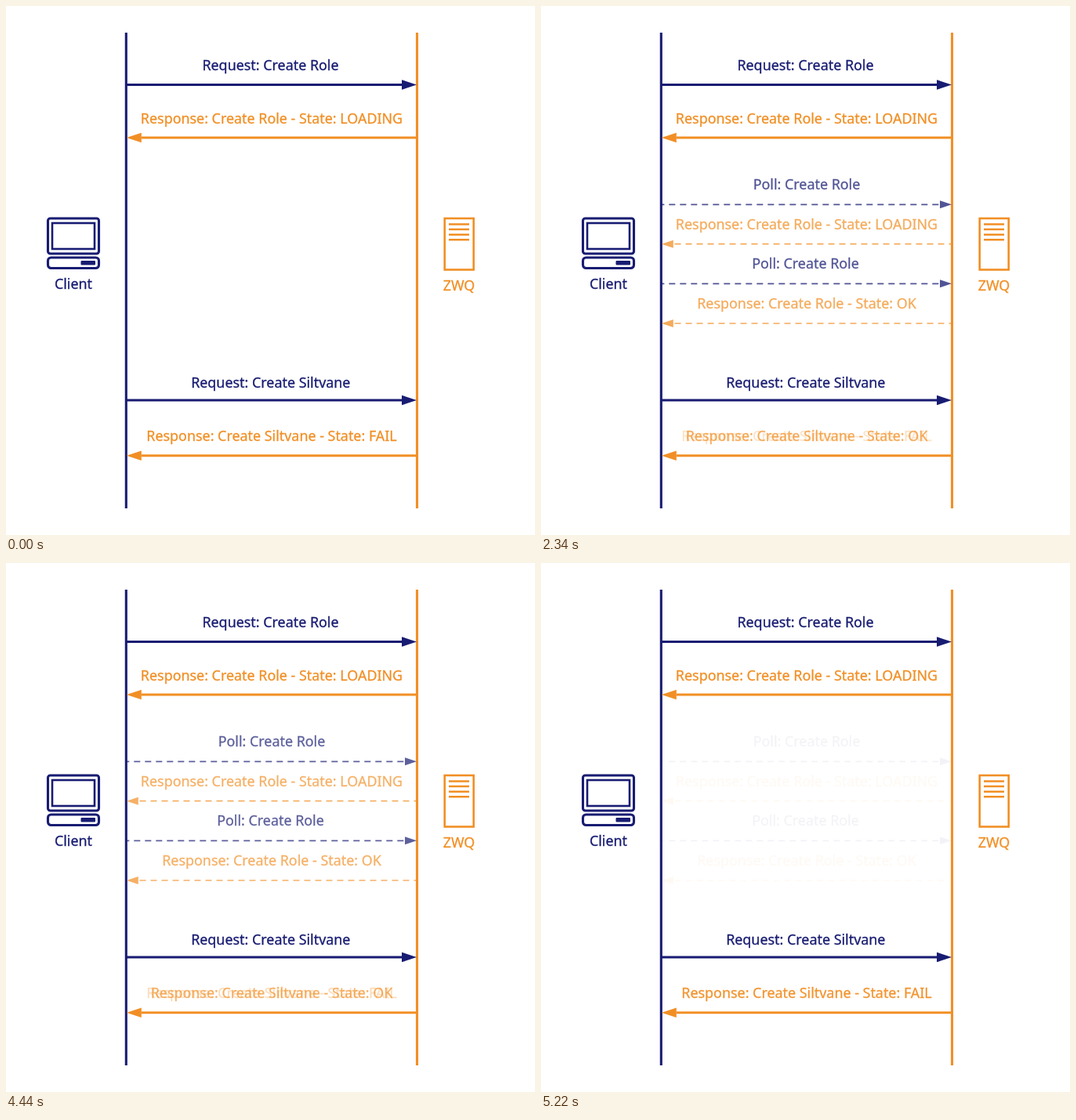
Recreate the animation shown at these times as an HTML page. Size 675 px wide and 675 px high, loop 5.28 s.

```html
<!DOCTYPE html>
<html lang="en">
<head>
<meta charset="utf-8">
<title>Polling sequence</title>
<style>
  html, body { margin: 0; width: 100%; height: 100%; overflow: hidden; background: #fff; }
  svg { display: block; width: 100%; height: 100%; }
  text {
    font: 17.9px "Noto Sans", "Open Sans", sans-serif;
    text-anchor: middle;
    stroke: currentColor;
    stroke-width: 0.3;
  }
  .navy { color: #181c72; }
  .orange { color: #f18f25; }
  .ink { fill: currentColor; }
  .line { fill: none; stroke: currentColor; stroke-width: 3.1; }
  .thin { stroke-width: 2.6; }
  .dashed { stroke-width: 1.7; stroke-dasharray: 8 6; stroke-dashoffset: 4; }
</style>
</head>
<body>
<svg viewBox="0 0 675 675">
  <g id="base">
    <g class="navy">
      <path class="line" d="M153.3 34V641"/>
      <rect class="line" x="53.5" y="271" width="65" height="45" rx="3"/>
      <rect class="line thin" x="59" y="277" width="54" height="33"/>
      <rect class="line" x="53.5" y="321" width="65" height="13.5" rx="4"/>
      <rect class="ink" x="95.5" y="325" width="18.5" height="5.5" rx="1"/>
      <text class="ink" x="86" y="361">Client</text>
    </g>
    <g class="orange">
      <path class="line" d="M524.5 34V641"/>
      <rect class="line thin" x="559.7" y="271" width="37" height="65.5"/>
      <path class="line thin" d="M565 278.5h26M565 285h26M565 291.7h26M565 298.3h26"/>
      <text class="ink" x="578" y="363">ZWQ</text>
    </g>
  </g>
  <g id="poll"></g>
  <g id="fail"></g>
  <g id="ok"></g>
</svg>
<script>
const LOOP = 5280;
const LEFT = 153.3, RIGHT = 524.5;
const layer = id => document.getElementById(id);

function add(parent, tag, attrs, text = "") {
  const el = document.createElementNS(parent.namespaceURI, tag);
  for (const key in attrs) el.setAttribute(key, attrs[key]);
  el.textContent = text;
  return parent.appendChild(el);
}

function label(id, tone, x, y, text) {
  add(layer(id), "text", { class: `ink ${tone}`, x, y }, text);
}

// Navy arrows point right, orange arrows point left.
function arrow(id, tone, y, dashed) {
  const right = tone === "navy";
  const dir = right ? 1 : -1;
  const from = right ? LEFT : RIGHT;
  const tip = right ? RIGHT - 0.5 : LEFT + 0.5;
  const [len, half] = dashed ? [15, 5] : [19, 6.3];
  const neck = tip - dir * len;
  const g = add(layer(id), "g", { class: tone });
  add(g, "path", { class: dashed ? "line dashed" : "line", d: `M${from} ${y}H${neck}` });
  add(g, "path", { class: "ink", d: `M${tip} ${y}L${neck} ${y - half}V${y + half}Z` });
}

[
  ["base", "navy", 337.5, 82, "Request: Create Role", 100.5],
  ["base", "orange", 339, 150, "Response: Create Role - State: LOADING", 168],
  ["poll", "navy", 339, 234, "Poll: Create Role", 253.3],
  ["poll", "orange", 339, 285, "Response: Create Role - State: LOADING", 303.7],
  ["poll", "navy", 337.5, 335, "Poll: Create Role", 354.3],
  ["poll", "orange", 339, 386, "Response: Create Role - State: OK", 405],
  ["base", "navy", 337.8, 487, "Request: Create Siltvane", 503]
].forEach(([id, tone, x, y, text, lineY]) => {
  label(id, tone, x, y, text);
  arrow(id, tone, lineY, id === "poll");
});
arrow("base", "orange", 573.8);
label("fail", "orange", 339, 555, "Response: Create Siltvane - State: FAIL");
label("ok", "orange", 339, 555, "Response: Create Siltvane - State: OK");

// Fades move by 1/20 every 60 ms.
const steps = [
  [0, 0, "linear"],
  [1500, 0, "steps(20, jump-start)"],
  [2700, 1, "linear"],
  [4140, 1, "steps(19, jump-start)"],
  [LOOP, 0.05, "linear"]
];

function fade(id, invert) {
  const frames = steps.map(([t, v, easing]) => ({
    offset: t / LOOP, opacity: invert ? 1 - v : v, easing
  }));
  const anim = layer(id).animate(frames, { duration: LOOP, iterations: Infinity });
  anim.startTime = document.timeline.currentTime;
}

fade("poll");
fade("ok");
fade("fail", true);
</script>
</body>
</html>
```
